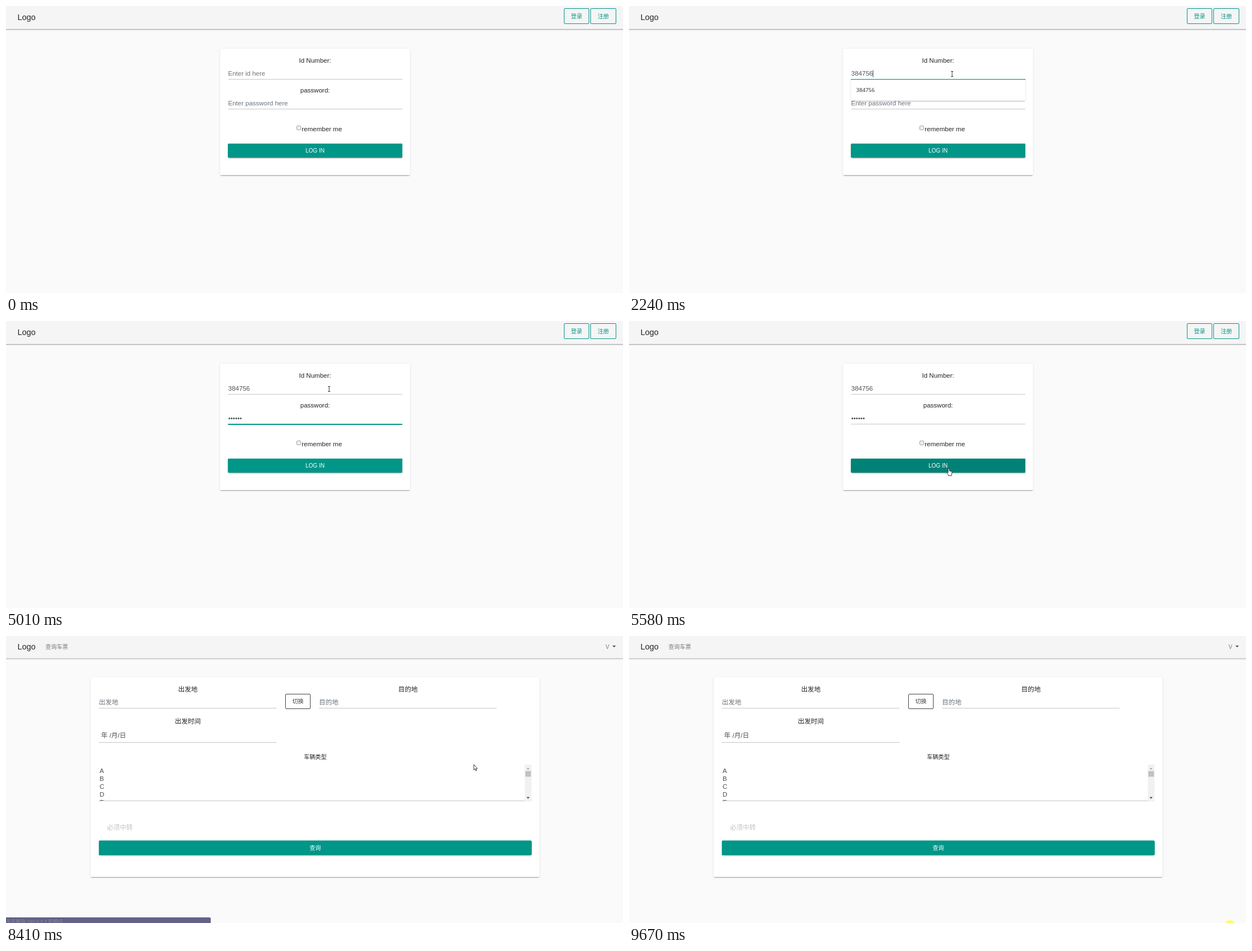
These frames come from a looping animation (1096x511 px, 9.74 s). An HTML page with a canvas:

```html
<!DOCTYPE html>
<html lang="zh">
<head>
<meta charset="utf-8">
<title>Log in</title>
<style>
  html, body { margin: 0; width: 100%; height: 100%; overflow: hidden; background: #fafafa; }
  canvas { display: block; }
</style>
</head>
<body>
<canvas id="stage" width="1096" height="511"></canvas>
<script>
const ctx = document.getElementById('stage').getContext('2d');
const LOOP = 9740;
const TEAL = '#009688', TEAL_DARK = '#008276', INK = '#212529', INPUT = '#495057', HINT = '#6c757d', RULE = '#c6c6c6';
const BODY = 11.52, SMALL = 10.08, BRAND = 14.4;
const USER_ID = '384756';

const FOCUS_ID = 770, FOCUS_PASSWORD = 2570, PRESS = 5480, STATUS = 7050, NEXT_PAGE = 8120, FADE = 8350;
const ID_KEYS = [1500, 1590, 1920, 1980, 2140, 2240];
const PASSWORD_KEYS = [3440, 3550, 3660, 4090, 4290, 4490];

// Pointer hot spot: time, x, y
const POINTER = [
  [180, 1025, 511], [740, 574, 121], [5010, 574, 121], [5440, 568, 262],
  [7940, 568, 262], [8030, 725, 244], [8120, 831, 229], [8420, 831, 229],
  [8680, 905, 141], [9290, 1061, 505], [9360, 1061, 505], [9420, 1064, 512]
];

const clamp = v => Math.min(1, Math.max(0, v));
const smooth = v => v * v * (3 - 2 * v);
const typed = (keys, t) => keys.filter(k => k <= t).length;

function text(str, x, y, size = BODY, color = INK, align = 'left', family = '"Liberation Sans"') {
  ctx.font = `${size}px ${family}, "Noto Sans CJK SC", "Noto Sans CJK", sans-serif`;
  ctx.fillStyle = color;
  ctx.textAlign = align;
  ctx.fillText(str, x, y);
}

function rect(x, y, w, h, color) {
  ctx.fillStyle = color;
  ctx.fillRect(x, y, w, h);
}

function rounded(x, y, w, h, r = 1.5) {
  ctx.beginPath();
  ctx.roundRect(x, y, w, h, r);
}

function polygon(color, ...points) {
  ctx.beginPath();
  points.forEach(([x, y]) => ctx.lineTo(x, y));
  ctx.fillStyle = color;
  ctx.fill();
}

// Raised surface with three stacked shadows: offset, blur, inset, alpha
function panel(x, y, w, h, color) {
  ctx.fillStyle = color;
  for (const [dy, blur, inset, alpha] of [[1.44, 1.44, 0, .14], [2.16, .72, 1.44, .2], [.72, 3.6, 0, .12]]) {
    ctx.save();
    ctx.shadowColor = `rgba(0,0,0,${alpha})`;
    ctx.shadowOffsetY = dy;
    ctx.shadowBlur = blur;
    rounded(x + inset, y + inset, w - 2 * inset, h - 2 * inset);
    ctx.fill();
    ctx.restore();
  }
  rounded(x, y, w, h);
  ctx.fill();
}

function outlineButton(x, y, w, h, label, color) {
  rounded(x, y, w, h);
  ctx.strokeStyle = color;
  ctx.lineWidth = 1;
  ctx.stroke();
  text(label, x + w / 2, y + h / 2 + 3.9, SMALL, color, 'center');
}

function navbar(height) {
  rect(0, 0, 1096, 511, '#fafafa');
  panel(-6, -6, 1108, height + 6, '#f5f5f5');
  text('Logo', 20.6, height - 16, BRAND);
}

function focusLine(y, age) {
  const w = 309.5 * (1 - (1 - clamp(age / 300)) ** 2);
  rect(549.2 - w / 2, y, w, 2, TEAL);
}

function caret(x, y, since, t) {
  if ((t - since) % 1000 < 500) rect(Math.round(x), y, 1, 13, INPUT);
}

function loginPage(t) {
  navbar(41);
  outlineButton(991.5, 4.5, 44, 27, '登录', TEAL);
  outlineButton(1038.5, 4.5, 45, 27, '注册', TEAL);
  panel(380.5, 76, 337, 225, '#fff');
  text('Id Number:', 549, 101, BODY, INK, 'center');
  text('password:', 549, 154, BODY, INK, 'center');
  rect(394.5, 130, 309.5, 1, RULE);
  rect(394.5, 183, 309.5, 1, RULE);

  const idCount = typed(ID_KEYS, t), dotCount = typed(PASSWORD_KEYS, t);
  const idFocused = t >= FOCUS_ID && t < FOCUS_PASSWORD;
  if (idCount) text(USER_ID.slice(0, idCount), 394.8, 123.5, BODY, INPUT);
  else text('Enter id here', 394.5, 123.5, BODY, HINT);
  if (dotCount) text('•'.repeat(dotCount), 394.8, 177, BODY, INPUT);
  else text('Enter password here', 394.5, 177, BODY, HINT);

  if (idFocused) {
    focusLine(130, t - FOCUS_ID);
    caret(394.4 + idCount * 6.4, 114, ID_KEYS[idCount - 1] ?? FOCUS_ID, t);
  } else if (t >= FOCUS_PASSWORD && t < PRESS) {
    focusLine(183, t - FOCUS_PASSWORD);
    caret(394.4 + dotCount * 4.03, 167, PASSWORD_KEYS[dotCount - 1] ?? FOCUS_PASSWORD, t);
  }

  rounded(516.5, 213.5, 7, 7, 1);
  ctx.fillStyle = '#efefef';
  ctx.fill();
  ctx.strokeStyle = '#a0a0a0';
  ctx.lineWidth = 1;
  ctx.stroke();
  text('remember me', 525.2, 222.5);
  panel(394.5, 245, 309.5, 25, t >= 5420 ? TEAL_DARK : TEAL);
  text('LOG IN', 549, 261, SMALL, '#fff', 'center');

  if (idFocused && idCount) {
    panel(394.5, 131.5, 309.5, idCount > 1 ? 37 : 167, '#fff');
    text(USER_ID, 403.5, 153, 9.6, INK, 'left', '"Open Sans"');
  }
}

function searchField(x, y, hint, color) {
  text(hint, x, y - 7, BODY, color);
}

function searchPage() {
  navbar(39.5);
  text('查询车票', 70, 22.7, SMALL, '#7a7a7a');
  text('V', 1065, 22.5, SMALL, '#7a7a7a');
  polygon('#555', [1077, 17], [1083.5, 17], [1080.2, 20.3]);
  panel(150.5, 73.5, 797, 355.5, '#fff');

  text('出发地', 323, 99.4, BODY, INK, 'center');
  text('目的地', 714, 99.4, BODY, INK, 'center');
  text('出发时间', 323, 156.2, BODY, INK, 'center');
  text('车辆类型', 549.3, 219, SMALL, INK, 'center');
  searchField(165, 128.8, '出发地', HINT);
  searchField(556, 128.8, '目的地', HINT);
  searchField(169, 188.4, '年 /月/日', INPUT);
  for (const [x, y] of [[165, 128], [556, 128], [165, 189]]) rect(x, y, 315.5, 1, RULE);
  outlineButton(496.5, 103.5, 44, 26, '切换', '#444');

  ctx.save();
  ctx.beginPath();
  ctx.rect(165, 229, 768, 65.5);
  ctx.clip();
  [...'ABCDE'].forEach((letter, i) => text(letter, 166.3, 244 + i * 13.9, BODY, INPUT));
  ctx.restore();
  rect(165, 293, 768, 1, RULE);
  rect(921.5, 229, 12, 65.5, '#f1f1f1');
  rect(922.5, 240.5, 10, 10, '#c1c1c1');
  polygon('#a3a3a3', [924.7, 237.3], [930, 237.3], [927.4, 234.5]);
  polygon('#444', [924.7, 286.7], [930, 286.7], [927.4, 289.7]);

  text('必须中转', 179.3, 345.4, BODY, '#bfc3c5');
  panel(165, 364.5, 768.5, 25.5, TEAL);
  text('查询', 549.3, 380.9, SMALL, '#fff', 'center');
}

function statusBar(t) {
  ctx.globalAlpha = 1 - clamp((t - FADE) / 160);
  rounded(-4, 501, 367.7, 20, 2.5);
  ctx.fillStyle = '#05053f';
  ctx.fill();
  text('正在等待 192.0.2.7 的响应...', 0, 512, 8.64, '#a3a3b5');
  ctx.globalAlpha = 1;
}

function pointerAt(t) {
  const next = POINTER.findIndex(p => p[0] > t);
  const [t0, x0, y0] = POINTER[next - 1], [t1, x1, y1] = POINTER[next];
  const k = smooth((t - t0) / (t1 - t0));
  return [x0 + (x1 - x0) * k, y0 + (y1 - y0) * k];
}

const SHAPES = {
  arrow: new Path2D('M0 0V9.4L2.1 7.5 3.7 11 5.1 10.3 3.6 7H6.5Z'),
  hand: new Path2D('M-1.1.8Q0-.4 1.1.8V4.8L4.8 5.8Q6 6.3 5.8 8L4.9 11.3V13.3H-.8V12L-3.6 8.6Q-3.6 6.6-1.1 8.2Z'),
  beam: new Path2D('M-2-4.5H2M0-4.5V4.5M-2 4.5H2')
};

function pointerShape(x, y, t) {
  if (t >= NEXT_PAGE || x < 394 || x > 704) return 'arrow';
  if (y > 245 && y < 270) return t >= 6560 && t < STATUS ? 'arrow' : 'hand';
  return (y > 111 && y < 131) || (y > 165 && y < 184) ? 'beam' : 'arrow';
}

function clickMark(x, y) {
  ctx.beginPath();
  ctx.arc(x, y, 9, 0, 7);
  ctx.fillStyle = 'rgba(255,250,70,.85)';
  ctx.fill();
}

function pointer(t) {
  if (t >= 9670) clickMark(1067.7, 515);
  if (t < 180 || t >= 9420) return;
  const [x, y] = pointerAt(t);
  if ([FOCUS_ID, PRESS].some(c => t >= c && t < c + 80)) clickMark(x, y);
  const name = pointerShape(x, y, t);
  ctx.save();
  ctx.translate(x, y);
  ctx.fillStyle = '#fff';
  ctx.strokeStyle = '#222';
  ctx.lineWidth = .9;
  if (name !== 'beam') ctx.fill(SHAPES[name]);
  ctx.stroke(SHAPES[name]);
  ctx.restore();
}

function draw() {
  const t = performance.now() % LOOP;
  if (t < NEXT_PAGE) loginPage(t);
  else searchPage();
  if (t >= STATUS && t < FADE + 160) statusBar(t);
  pointer(t);
  requestAnimationFrame(draw);
}
draw();
</script>
</body>
</html>
```
